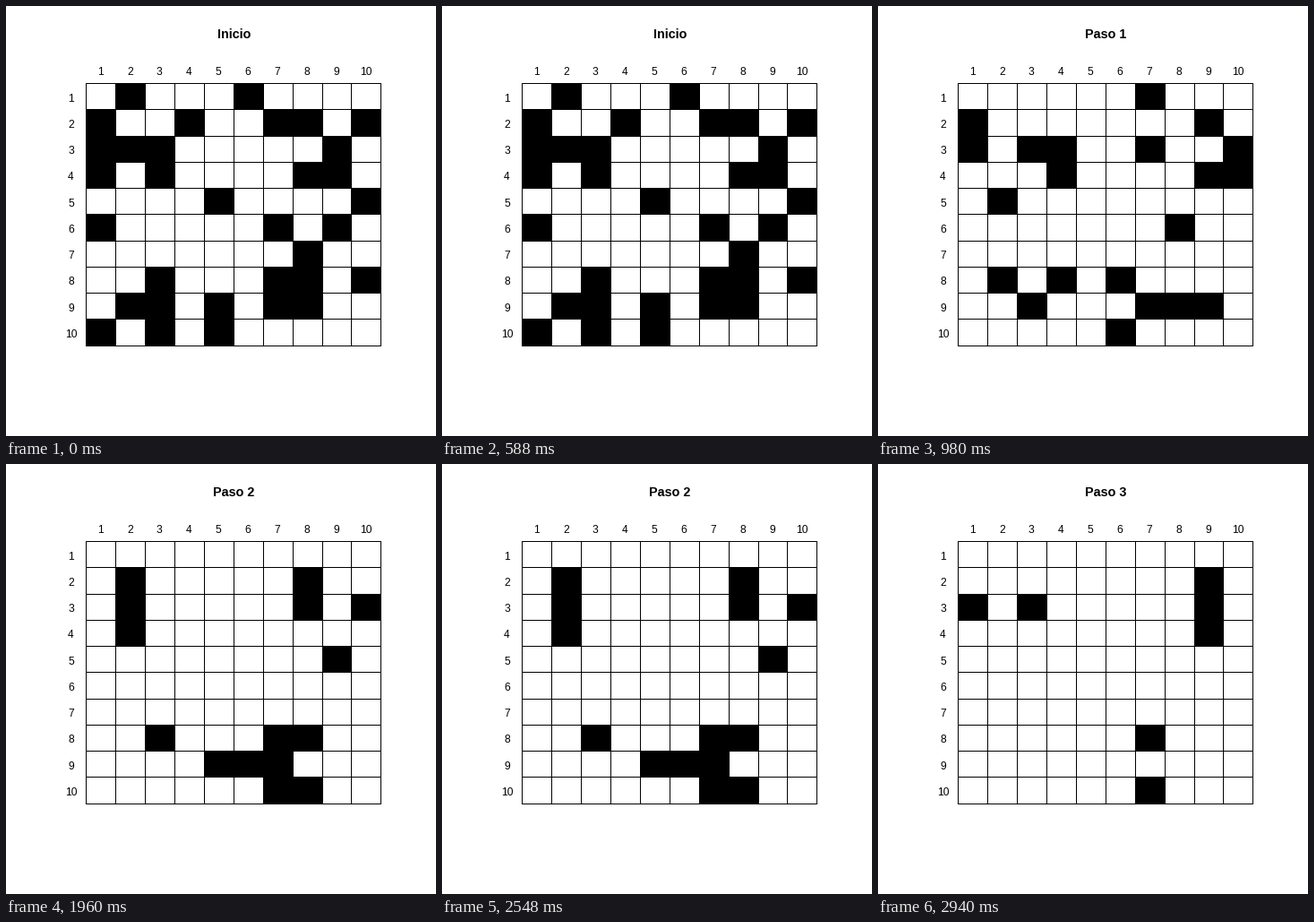
A matplotlib script for the animation above (3.92 s loop, 480 by 480 pixels).

```python
import matplotlib.pyplot as plt
import numpy as np
from matplotlib.animation import FuncAnimation
from matplotlib.patches import Rectangle

SIZE = 480
N = 10
STEPS = 4
UNIT_X, UNIT_Y = 32.889, 29.253

START = [
    ".#...#....",
    "#..#..##.#",
    "###.....#.",
    "#.#....##.",
    "....#....#",
    "#.....#.#.",
    ".......#..",
    "..#...##.#",
    ".##.#.##..",
    "#.#.#.....",
]


def px(v):
    return 59.04 + (v + 0.44) * UNIT_X


def py(v):
    return 59.04 + (v + 0.44) * UNIT_Y


def step(grid):
    """A cell is alive exactly when it had three live neighbours."""
    p = np.pad(grid, 1)
    count = sum(p[r:r + N, c:c + N] for r in range(3) for c in range(3)) - grid
    return (count == 3).astype(int)


grids = [np.array([[int(ch == "#") for ch in row] for row in START])]
while len(grids) < STEPS:
    grids.append(step(grids[-1]))

plt.rcParams["font.family"] = "Liberation Sans"
fig = plt.figure(figsize=(SIZE / 72, SIZE / 72), dpi=72, facecolor="white")
ax = fig.add_axes([0, 0, 1, 1])
ax.set_xlim(0, SIZE)
ax.set_ylim(SIZE, 0)
ax.axis("off")


def box(x, y, w, h, **kw):
    return ax.add_patch(Rectangle((x, y), w, h, fc="black", lw=0, **kw))


def label(x, y, text, **kw):
    return ax.text(x, y, text, ha="center", va="baseline", color="black", **kw)


# Grid lines are one pixel wide and sit on whole pixels
xs = [int(px(k + 0.5)) for k in range(N + 1)]
ys = [int(py(k + 0.5)) for k in range(N + 1)]
for x in xs:
    box(x, ys[0], 1, ys[-1] - ys[0] + 1)
for y in ys:
    box(xs[0], y, xs[-1] - xs[0] + 1, 1)

for k in range(1, N + 1):
    label(px(k) - 1, round(py(0) + 5.4), str(k), fontsize=12)
    label(px(0) - 1, round(py(k) + 5.4), str(k), fontsize=12)

title = label(px(5.5), 36, "", fontsize=14.4, weight="bold")

cells = {}
for r in range(N):
    for c in range(N):
        w, h = xs[c + 1] - xs[c] + 1, ys[r + 1] - ys[r] + 1
        cells[r, c] = box(xs[c], ys[r], w, h, visible=False)


def draw(i):
    title.set_text(f"Paso {i}" if i else "Inicio")
    for pos, cell in cells.items():
        cell.set_visible(bool(grids[i][pos]))
    return [title, *cells.values()]


anim = FuncAnimation(fig, draw, frames=STEPS, interval=980, repeat=True)
plt.show()
```
